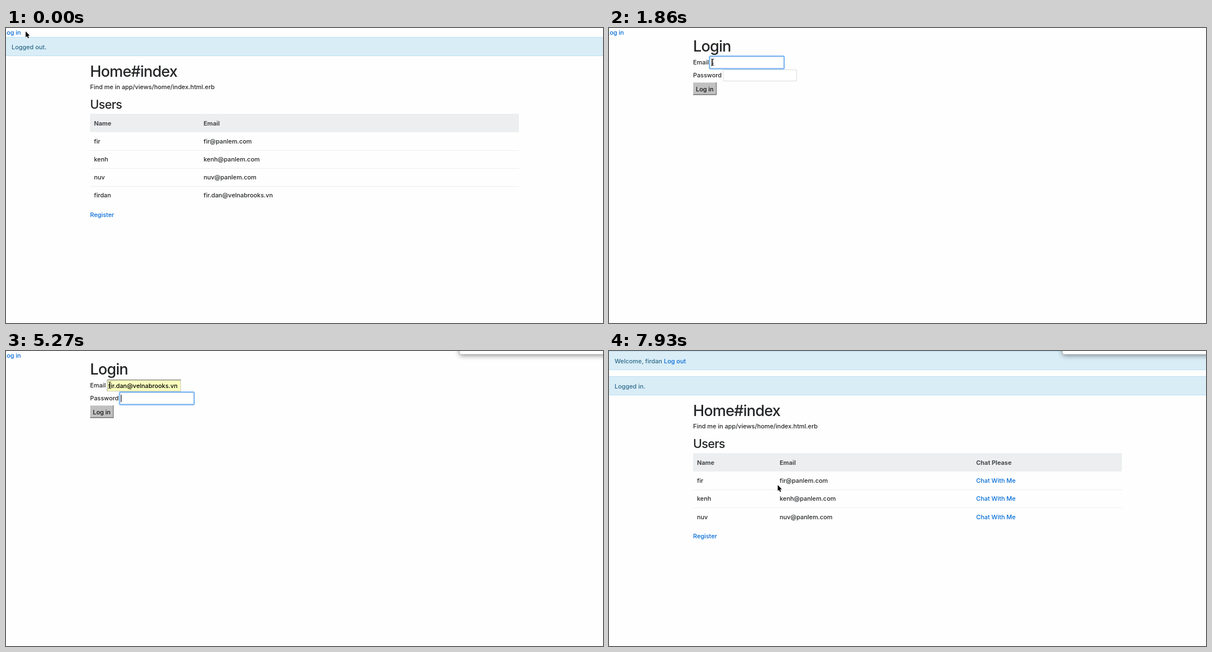
Write an HTML page with a canvas that moves like this. It is 1065 px wide and 526 px high and loops after 8 s.

```html
<!DOCTYPE html>
<html lang="en">
<head>
<meta charset="utf-8">
<title>Login demo</title>
<style>
  html, body { margin: 0; width: 100%; height: 100%; overflow: hidden; background: #fefefe; }
  canvas { display: block; }
</style>
</head>
<body>
<canvas id="stage" width="1065" height="526"></canvas>
<script>
const ctx = document.getElementById('stage').getContext('2d');
const W = 1065, H = 526, LOOP = 8000, ROW = 32.15;
const INK = '#232527', LINK = '#026bd8', HOVER = '#014c8c', INFO = '#2d6a88', LINE = '#eceeef';

const users = [
  ['fir', 'fir@panlem.com'],
  ['kenh', 'kenh@panlem.com'],
  ['nuv', 'nuv@panlem.com'],
  ['firdan', 'fir.dan@velnabrooks.vn']
];
const hints = [users[0][1], users[3][1], 'fir.dan'];

// Pointer: start time, shape, x, y. Each entry holds until the next.
const pointer = [
  [0, arrow, 35, 6],
  [140, arrow, 30, 7],
  [310, hand, 20, 8],
  [470, hand, 17, 7],
  [950, arrow, 58, 20],
  [1120, arrow, 111, 40],
  [1270, arrow, 142, 50],
  [1420, beam, 172, 58],
  [1560, beam, 185, 61],
  [6750, arrow, 150, 82],
  [6900, arrow, 117, 101],
  [7050, arrow, 140, 106],
  [7200, arrow, 160, 108],
  [7780, arrow, 236, 180],
  [7930, arrow, 301, 239]
];

function at(list, t) {
  return list.reduce((hit, item) => item[0] <= t ? item : hit);
}

function rect(x, y, w, h, color) {
  ctx.fillStyle = color;
  ctx.fillRect(x, y, w, h);
}

function text(str, x, y, color = INK, { size = 10.88, weight = 450, track = 0 } = {}) {
  ctx.font = `${weight} ${size}px Inter, Roboto, sans-serif`;
  ctx.letterSpacing = track + 'px';
  ctx.fillStyle = color;
  ctx.fillText(str, x, y);
  return ctx.measureText(str).width;
}

const bold = (str, x, y) => text(str, x, y, '#464a4c', { weight: 700 });
const h1 = (str, y) => text(str, 150, y, INK, { size: 27, weight: 500, track: -0.8 });
const h2 = (str, y) => text(str, 150, y, INK, { size: 21.6, weight: 500, track: -0.7 });

function alertBar(y, message) {
  rect(0, y, W, 34, '#bcdff1');
  rect(0, y + 1, W, 32, '#d9edf7');
  text(message, 10, y + 21.5, INFO);
}

function loginLink(hover) {
  const color = hover ? HOVER : LINK;
  const w = text('Log in', -5, 12.3, color);
  if (hover) rect(0, 13.4, w - 5, 0.9, color);
}

function home(dy, rows, emailX, chat) {
  h1('Home#index', 86.5 + dy);
  text('Find me in app/views/home/index.html.erb', 150, 108.6 + dy);
  h2('Users', 143.8 + dy);
  rect(150, 153 + dy, 765, 32.6, LINE);
  bold('Name', 157, 173.7 + dy);
  bold('Email', emailX, 173.7 + dy);
  if (chat) bold('Chat Please', 655, 173.7 + dy);
  rows.forEach(([name, email], i) => {
    const y = 206 + dy + i * ROW;
    if (i) rect(150, Math.round(y - 20.4), 765, 1, LINE);
    text(name, 157, y);
    text(email, emailX, y);
    if (chat) text('Chat With Me', 655, y, LINK);
  });
  text('Register', 150, 208.2 + dy + rows.length * ROW, LINK);
}

function ring(x, y) {
  ctx.lineWidth = 2.4;
  ctx.strokeStyle = '#86bdf6';
  ctx.beginPath();
  ctx.roundRect(x, y, 133.2, 22.6, 2);
  ctx.stroke();
}

function field(x, y, filled, focus) {
  if (filled) {
    rect(x, y, 132, 21, '#cdcfae');
    rect(x, y, 132, 1.4, '#777');
    rect(x, y, 1, 21, '#aaa');
    rect(x + 1, y + 1.4, 130, 18.6, '#faffbd');
  } else {
    rect(x, y, 132, 21, '#dcdcdc');
    rect(x + 1, y + 1, 130, 19, '#fff');
  }
  if (focus) ring(x - 0.7, y - 0.8);
}

function button(disabled) {
  rect(150, 97, 42, 22.5, '#6f6f6f');
  rect(150, 97, 40.6, 21, '#d0d0d0');
  rect(151, 98, 39.6, 20, '#c0c0c0');
  text('Log in', 155, 112.5, disabled ? '#808080' : '#111');
}

function dropdown(pick) {
  rect(180, 72.6, 132.4, 56, '#8fbfea');
  rect(181, 73.4, 130.4, 54.4, '#fff');
  hints.forEach((hint, i) => {
    const y = 73.6 + i * 18.2;
    if (i === pick) rect(181, y, 130.4, 18, '#acd3fd');
    text(hint, 187, y + 12.9, '#000', { size: 9.9, weight: 700 });
  });
}

function panel() {
  ctx.save();
  ctx.shadowColor = 'rgba(0,0,0,.45)';
  ctx.shadowBlur = 10;
  ctx.shadowOffsetY = 2;
  ctx.fillStyle = '#fff';
  ctx.beginPath();
  ctx.roundRect(809, -40, 300, 46, 3);
  ctx.fill();
  ctx.restore();
  ctx.strokeStyle = '#b4b4b4';
  ctx.lineWidth = 0.8;
  ctx.stroke();
}

function login(t) {
  const pick = t < 3200 ? -1 : t < 3640 ? 0 : 1;
  const typed = t < 2460 ? '' : t < 2610 ? 'f' : 'fi';
  const value = pick < 0 ? typed : hints[pick];
  const onEmail = t >= 1860 && t < 4380;
  const onPassword = t >= 4380 && t < 7490;
  const open = t >= 2460 && t < 3940;
  const preview = open && pick >= 0;

  h1('Login', 41.5);
  text('Email', 150, 65.4);
  text('Password', 150, 88.2);
  field(180, 51, pick >= 0, onEmail);
  field(203.2, 74, false, onPassword);
  button(t >= 7490);

  if (preview) {
    const from = 182.5 + text('fi', 182.5, 65.8);
    const to = 182.5 + text(value, 182.5, 65.8);
    rect(from, 55, to - from, 13.6, '#b0d8d6');
  }
  const end = 182.5 + text(value, 182.5, 65.8, '#000');
  if (onEmail && !preview) rect(Math.round(end), 55, 1, 13, '#000');

  const dots = Math.max(0, Math.min(4, Math.floor((t - 5720) / 146.6) + 1));
  ctx.fillStyle = '#000';
  for (let i = 0; i < dots; i++) {
    ctx.beginPath();
    ctx.arc(208.3 + i * 5.8, 85.4, 2, 0, 7);
    ctx.fill();
  }
  const blink = (t >= 4830 && t < 5270) || (t >= 6600 && t < 7050);
  if (onPassword && !blink) rect(dots ? 205 + dots * 5.6 : 205, 78, 1, 13, '#000');

  if (open) dropdown(pick);
}

function outline(points, fill, stroke) {
  ctx.beginPath();
  points.forEach(([x, y]) => ctx.lineTo(x, y));
  ctx.closePath();
  ctx.lineJoin = 'round';
  ctx.lineWidth = 1.4;
  ctx.strokeStyle = stroke;
  ctx.stroke();
  ctx.fillStyle = fill;
  ctx.fill();
}

function arrow() {
  outline([[0, 0], [0, 10.6], [2.4, 8.4], [4.1, 12.3], [5.9, 11.5], [4.2, 7.8], [7.4, 7.6]], '#000', '#fff');
}

function hand() {
  outline([[-2, 0], [-0.6, -0.8], [0.4, 0], [1.5, 4], [2.8, 3.4], [3.8, 4.2], [5, 3.9],
    [5.8, 5], [6.8, 5.1], [7, 8], [5.8, 10.4], [5.6, 12.4], [0.4, 12.4], [-1.4, 9.6],
    [-4.2, 6.4], [-3.6, 5.4], [-2.2, 5.8], [-0.8, 7.2]], '#fff', '#111');
  ctx.fillStyle = '#111';
  [1, 2.8, 4.6].forEach(x => ctx.fillRect(x, 7.6, 0.6, 3));
}

function beam() {
  ctx.strokeStyle = '#222';
  ctx.lineWidth = 1;
  ctx.beginPath();
  for (const s of [-1, 1]) {
    ctx.moveTo(-2.5, s * 6);
    ctx.quadraticCurveTo(0, s * 6, 0, s * 4.4);
    ctx.quadraticCurveTo(0, s * 6, 2.5, s * 6);
  }
  ctx.moveTo(0, -5);
  ctx.lineTo(0, 5);
  ctx.moveTo(-1.5, 2);
  ctx.lineTo(1.5, 2);
  ctx.stroke();
}

function draw(t) {
  const [, shape, x, y] = at(pointer, t);
  rect(0, 0, W, H, '#fefefe');

  if (t < 640) {
    loginLink(shape === hand);
    alertBar(16, 'Logged out.');
    home(0, users, 352.5, false);
  } else if (t < 7640) {
    loginLink(shape === hand);
    login(t);
  } else {
    alertBar(0, 'Welcome, firdan');
    text('Log out', 98, 21.5, LINK);
    alertBar(45, 'Logged in.');
    home(29.2, users.slice(0, 3), 304.5, true);
  }
  if (t >= 3050) panel();

  ctx.save();
  ctx.translate(x, y);
  shape();
  ctx.restore();
}

const start = performance.now();
function tick() {
  draw((performance.now() - start) % LOOP);
  requestAnimationFrame(tick);
}
tick();
</script>
</body>
</html>
```
